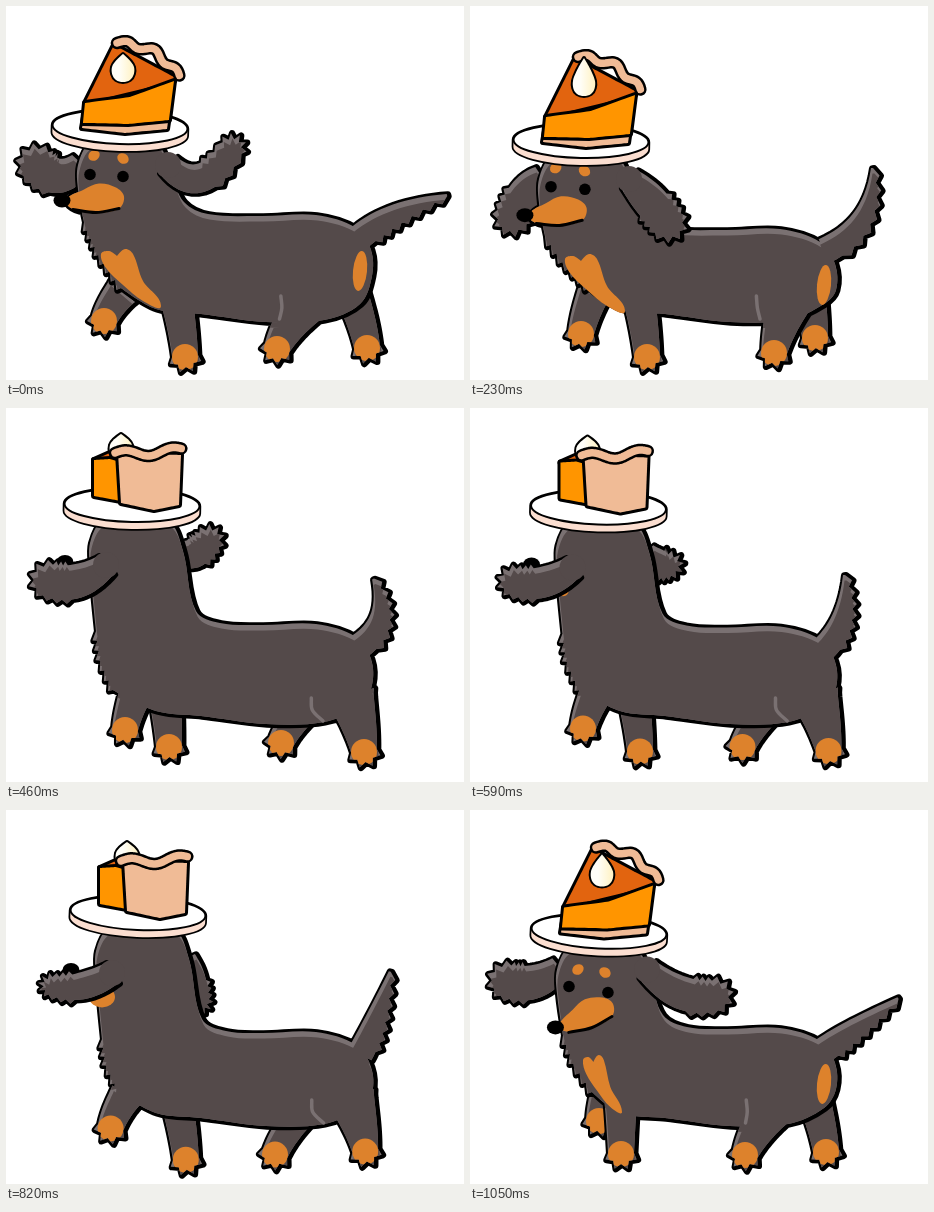
Write an HTML page with a canvas that moves like this. It is 458 by 374 pixels and loops after 1.15 s.

```html
<!DOCTYPE html>
<html lang="en">
<head>
<meta charset="utf-8">
<title>Dachshund with pie</title>
<style>
html, body { margin: 0; width: 100%; height: 100%; overflow: hidden; background: #fff; }
canvas { display: block; }
</style>
</head>
<body>
<canvas id="stage" width="458" height="374"></canvas>
<script>
const ctx = document.getElementById('stage').getContext('2d');
const INK = '#000', COAT = '#544a4a', SHEEN = '#7a7172', TAN = '#dd822c';
const ORANGE = '#ff9500', SPICE = '#e2640f', CRUST = '#f0bb96', RIM = '#fbded0';
const SMOOTH = 0, CORNER = 1, FUR = 2;
const { PI, sin, cos, hypot, atan2 } = Math;
const mix = (a, b, t) => a + (b - a) * t;

// ---- shapes: every outline runs clockwise ----

function addFur(path, [ax, ay], [bx, by]) {
  const dx = bx - ax, dy = by - ay, len = hypot(dx, dy), n = Math.round(len / 10);
  const lean = dy > 0 ? .85 : .1;
  for (let i = 0; i < n; i++) {
    const k = (i + lean) / n, end = (i + 1) / n;
    path.lineTo(ax + dx * k + dy / len * 5, ay + dy * k - dx / len * 5);
    path.lineTo(ax + dx * end, ay + dy * end);
  }
}

// Spline through [x, y, kind]; FUR points are reached along a shaggy edge.
function curve(pts, closed = true) {
  const path = new Path2D(), n = pts.length;
  const at = i => closed ? pts[(i + n) % n] : pts[Math.max(0, Math.min(n - 1, i))];
  const tangent = i => {
    if (at(i)[2]) return [0, 0];
    const [px, py] = at(i - 1), [qx, qy] = at(i + 1), d = hypot(qx - px, qy - py);
    return [(qx - px) / d, (qy - py) / d];
  };
  path.moveTo(...pts[0].slice(0, 2));
  for (let i = 0; i < (closed ? n : n - 1); i++) {
    const [ax, ay] = at(i), [bx, by, kind] = at(i + 1);
    if (kind === FUR) { addFur(path, at(i), at(i + 1)); continue; }
    const k = hypot(bx - ax, by - ay) / 3, [ux, uy] = tangent(i), [vx, vy] = tangent(i + 1);
    path.bezierCurveTo(ax + ux * k, ay + uy * k, bx - vx * k, by - vy * k, bx, by);
  }
  if (closed) path.closePath();
  return path;
}

// Tapered tube along a quadratic spine, with optional shaggy sides and a tufted end.
function limb(from, bend, to, half, shag = () => 0, tufts = 0) {
  const steps = 16, left = [], right = [];
  let angle;
  for (let i = 0; i <= steps; i++) {
    const t = i / steps;
    const [x, y] = [0, 1].map(k => mix(mix(from[k], bend[k], t), mix(bend[k], to[k], t), t));
    const [dx, dy] = [0, 1].map(k => mix(bend[k] - from[k], to[k] - bend[k], t));
    angle = atan2(dy, dx);
    const side = s => {
      const r = s * (half(t) + (i % 2 ? shag(t, s) : 0));
      return [x + sin(angle) * r, y - cos(angle) * r];
    };
    left.push(side(1));
    right.unshift(side(-1));
  }
  for (let k = 1; k < tufts; k++) {
    const a = angle + PI * (k / tufts - .5), r = half(1) + (k % 2 ? 4 : -2);
    left.push([to[0] + cos(a) * r, to[1] + sin(a) * r]);
  }
  const path = new Path2D();
  [...left, ...right].forEach(p => path.lineTo(...p));
  path.closePath();
  return path;
}

function oval(x, y, rx, ry = rx, turn = 0) {
  const path = new Path2D();
  path.ellipse(x, y, rx, ry, turn, 0, 2 * PI);
  return path;
}
function fill(path, color) { ctx.fillStyle = color; ctx.fill(path); }
function stroke(path, width, color = INK) {
  ctx.strokeStyle = color;
  ctx.lineWidth = width;
  ctx.stroke(path);
}
function shifted(x, y, paint) {
  ctx.save();
  ctx.translate(x, y);
  paint();
  ctx.restore();
}
function within(path, paint) {
  ctx.save();
  ctx.clip(path);
  paint();
  ctx.restore();
}

// Merged coat pieces: ink heavier on the right, pale rim along the top.
function coat(...pieces) {
  const path = new Path2D();
  pieces.forEach(p => path.addPath(p));
  shifted(1.2, .4, () => stroke(path, 6.5));
  fill(path, SHEEN);
  within(path, () => shifted(1.5, 5.5, () => fill(path, COAT)));
}

// ---- dog ----

const earRoots = {
  front: [[-39, 36], [48, 38]],
  side: [null, [39, 50]],
  away: [[-26, 60], [46, 46]]
};

function earPath(p, i) {
  const [px, py] = p.plate, [rx, ry] = earRoots[p.view][i], [tx, ty, sag, tip] = p.ears[i];
  const bend = [px + (rx + tx) / 2, py + (ry + ty) / 2 + sag];
  return limb([px + rx, py + ry], bend, [px + tx, py + ty],
    t => mix(12, tip, t) + 3 * sin(PI * t), t => t > .65 ? 4 : 0, 10);
}

function legPath([x, y], hind, near) {
  const hip = hind ? [mix(x, 335, .6), 288] : [mix(x, 150, .35), 285];
  const top = hind && near ? 25 : 17;
  const bend = [mix(x, hip[0], .25), mix(hip[1], y, .55)];
  return limb(hip, bend, [x, y], t => mix(top, 13, t ** .7), () => 0, 8);
}

function paw(leg, [x, y]) {
  within(leg, () => fill(oval(x, y + 1, 13, 13), TAN));
}

function torso({ view, plate: [px, py], back, chest }) {
  const jaw = px - (view === 'side' ? 26 : 36), throat = back + 6;
  return curve([
    [jaw - 6, py + 62], [jaw - 6, py + 38], [px - 30, py + 16], [px, py + 10], [px + 36, py + 15],
    [px + 51, py + 46], [px + 64, back - 14], [px + 88, back - 2], [255, back], [310, back - 1],
    [350, back + 12], [365, back + 34], [366, back + 60], [354, 298], [318, 314], [260, 316],
    [195, 308], [150, 303], [chest, 282, CORNER],
    [(chest + jaw) / 2 - 4, (282 + throat) / 2, FUR], [jaw, throat, FUR]
  ]);
}

function tailPath({ back, tail: [bx, by, tx, ty] }) {
  return limb([354, back + 21], [bx, by], [tx, ty], t => 12 * (1 - t ** 2) + 1,
    (t, side) => side < 0 && t > .15 ? 5 : 0);
}

// Muzzle points are relative to the middle between the eyes.
const muzzle = [[-40, 25], [-22, 14], [-7, 8], [10, 12], [18, 21], [13, 33], [-8, 37], [-32, 34]];
const profile = [[-80, 72], [-57, 67], [-42, 52], [-30, 25], [0, 40], [-15, 98], [-48, 100], [-74, 92]];
const profileTan = [[-76, 80], [-50, 74], [-28, 72], [-18, 80], [-18, 93], [-30, 99], [-50, 98], [-72, 92]];

function faceOf({ view, plate: [px, py], face }) {
  const place = pts => pts.map(([x, y]) => [px + x, py + y]);
  if (view === 'away') return { nose: [px - 67, py + 57] };
  if (view === 'side') return {
    outline: place(profile), tan: place(profileTan), nose: [px - 81, py + 77],
    mouth: place([[-75, 91], [-50, 99], [-27, 100]]), eyes: place([[-20, 65]]), brows: place([[-26, 46]])
  };
  const [eyeY, turn] = face, skew = 1 + 6 * turn;
  const spin = pts => place(pts.map(([x, y]) =>
    [x * cos(turn) + y * sin(turn) - 14 + 12 * turn, y * cos(turn) - x * sin(turn) + eyeY]));
  return {
    outline: spin(muzzle), tan: spin(muzzle), nose: spin([[-44, 25]])[0],
    mouth: spin([[-33, 34], [-10, 37], [13, 33]]),
    eyes: place([[-30, eyeY - skew], [3 + 18 * turn, eyeY + skew]]),
    brows: place([[-26 + 15 * turn, eyeY - 20], [3 + 9 * turn, eyeY - 17]])
  };
}

const heart = [[0, 0], [8, -3], [16, 2, CORNER], [24, -5], [32, 0], [42, 27], [60, 52], [42, 47], [22, 31], [5, 14]];

function dog(p) {
  const [px, py] = p.plate, away = p.view === 'away', [foreNear, hindNear, foreFar, hindFar] = p.feet;
  const face = faceOf(p), nose = oval(...face.nose, 8.5, 7);
  for (const [foot, hind] of [[hindFar, true], [foreFar, false]]) {
    const leg = legPath(foot, hind, false);
    coat(leg);
    paw(leg, foot);
  }
  const overEar = away ? 0 : 1;
  if (p.ears[1 - overEar]) coat(earPath(p, 1 - overEar));
  if (away) fill(nose, INK);

  const fore = legPath(foreNear, false, true), hind = legPath(hindNear, true, true);
  const pieces = [torso(p), tailPath(p), fore, hind];
  if (face.outline) pieces.push(curve(face.outline));
  coat(...pieces);
  paw(fore, foreNear);
  paw(hind, hindNear);
  const thigh = hindNear[0] * .35 + 180;
  stroke(curve([[thigh, 290], [thigh + 1, 302], [hindNear[0] * .5 + 138, 313]], false), 3.5, SHEEN);

  if (p.bib) {
    const [x, y, sx] = p.bib;
    fill(curve(heart.map(([hx, hy, kind]) => [x + hx * sx, y + hy, kind])), TAN);
  }
  if (p.view === 'front') fill(oval(354, p.back + 55, 7, 20, .1), TAN);
  if (away) fill(oval(px - 36, py + 84, p.cheek, p.cheek * .8), TAN);

  const [rx, ry] = earRoots[p.view][overEar];
  coat(earPath(p, overEar));
  fill(oval(px + rx, py + ry, 13), COAT);
  if (away) return;
  face.brows.forEach(([x, y], i) => fill(oval(x, y, 6, 5, i ? .6 : -.6), TAN));
  fill(curve(face.tan), TAN);
  stroke(curve(face.mouth, false), 3);
  fill(nose, INK);
  face.eyes.forEach(e => fill(oval(...e, 5.8), INK));
}

// ---- pie on a plate, measured from the middle of the plate ----

function slab(color, ...corners) {
  const path = curve(corners.map(([x, y]) => [x, y, CORNER]));
  stroke(path, 6);
  fill(path, color);
}
function lip(x0, y0, x1, y1, waves, bulge) {
  const path = new Path2D(), dx = x1 - x0, dy = y1 - y0, len = hypot(dx, dy);
  for (let t = 0; t <= 1; t += 1 / 40) {
    const off = 3 * sin(2 * PI * waves * t) + bulge * sin(PI * t);
    path.lineTo(x0 + dx * t + dy / len * off, y0 + dy * t - dx / len * off);
  }
  stroke(path, 12.5);
  stroke(path, 7.5, CRUST);
}
function cream(x, y, height) {
  const path = curve([[x, y - height, CORNER], [x + 11, y - 4], [x + 7, y + 9], [x - 7, y + 9], [x - 11, y - 4]]);
  const tint = ctx.createLinearGradient(x - 4, y, x + 13, y);
  tint.addColorStop(0, '#fffef8');
  tint.addColorStop(1, '#fff0bc');
  stroke(path, 4);
  fill(path, tint);
}

const pies = {
  front(height) {
    slab(SPICE, [-6, -82], [54, -50], [54, -46], [-35, -24]);
    slab(CRUST, [-36, -10], [49, -12], [47, 2], [5, 6], [-38, 1]);
    slab(ORANGE, [-35, -24], [10, -30], [54, -46], [49, -7], [8, -3], [-37, -4]);
    lip(-3, -84, 60, -49, 2.5, 10);
    cream(3, -56, height);
  },
  side(height) {
    slab(SPICE, [-40, -46], [-8, -61], [16, -66], [38, -42], [33, -38], [0, -40]);
    slab(CRUST, [-41, -8], [28, -2], [33, -38], [41, -38], [38, 4], [31, 9], [-5, 7], [-41, 1]);
    slab(ORANGE, [-40, -46], [0, -40], [33, -38], [31, 3], [-5, 2], [-41, -4]);
    lip(17, -67, 39, -39, 1.5, 3);
    cream(-9, -60, height);
  },
  away(height) {
    slab(SPICE, [-38, -45], [-20, -53], [-12, -44]);
    cream(-11, -56, height);
    slab(ORANGE, [-38, -45], [-22, -46], [-12, -43], [-11, -4], [-38, -9]);
    slab(CRUST, [-14, -52], [49, -50], [47, 0], [22, 5], [-11, -2]);
    lip(-17, -52, 51, -56, 1.5, -2);
  }
};

function dish({ view, plate: [x, y, tilt], drop }) {
  const rim = new Path2D(), top = oval(0, 0, 67.5, 17);
  rim.ellipse(0, 0, 67.5, 17, 0, PI, 0);
  rim.ellipse(0, 7, 67.5, 17, 0, 0, PI);
  rim.closePath();
  shifted(x, y, () => {
    ctx.rotate(tilt);
    stroke(rim, 3.5);
    fill(rim, RIM);
    fill(top, '#fff');
    stroke(top, 2);
    ctx.rotate(-tilt);
    pies[view](drop);
  });
}

// ---- poses: feet are near fore, near hind, far fore, far hind; ears are [x, y, sag, tip] ----

const frontUp = {
  view: 'front', plate: [114, 121, .03], drop: 17, back: 210, chest: 115, face: [48.5, 0], bib: [95, 248, 1],
  tail: [385, 205, 441, 189], ears: [[-84, 37, 24, 17], [112, 21, 43, 11]],
  feet: [[179, 350], [271, 342], [98, 314], [361, 341]]
};
const frontDown = {
  view: 'front', plate: [111, 135, .02], drop: 27, back: 224, chest: 118, face: [47, .05], bib: [95, 253, 1],
  tail: [405, 222, 402, 162], ears: [[-69, 76, -10, 16], [87, 82, -4, 16]],
  feet: [[177, 350], [304, 346], [111, 327], [345, 331]]
};
const frontTurn = {
  view: 'front', plate: [129, 121.5, .05], drop: 21, back: 219, chest: 122, face: [58, .33], bib: [113, 250, .65],
  tail: [380, 222, 428, 188], ears: [[-93, 49, 16, 16], [116, 64, 20, 15]],
  feet: [[151, 343], [275, 344], [129, 310], [356, 341]]
};
const sideA = {
  view: 'side', plate: [109, 112, .02], drop: 21, back: 219, chest: 107, bib: [97, 241, .35],
  tail: [400, 224, 379, 153], ears: [null, [71, 104, 5, 18]],
  feet: [[129, 346], [358, 343], [186, 343], [292, 336]]
};
const sideB = { ...sideA, feet: [[131, 343], [295, 337], [202, 331], [359, 343]] };
const awayUp = {
  view: 'away', plate: [126, 97, .02], drop: 15, back: 217, chest: 107, cheek: 1,
  tail: [387, 215, 367, 171], ears: [[-84, 75, 17, 16], [77, 35, 15, 12]],
  feet: [[119, 321], [358, 343], [163, 338], [275, 334]]
};
const awayDown = {
  view: 'away', plate: [131, 102, .04], drop: 15, back: 222, chest: 112, cheek: 11,
  tail: [373, 215, 381, 163], ears: [[-87, 73, 14, 10], [65, 80, 0, 9]],
  feet: [[107, 318], [359, 341], [177, 347], [270, 342]]
};

function blend(a, b, t) {
  if (typeof a === 'number') return mix(a, b, t);
  if (Array.isArray(a)) return a.map((v, i) => blend(v, b[i], t));
  if (typeof a === 'string') return a;
  return Object.fromEntries(Object.keys(a).map(k => [k, blend(a[k], b[k], t)]));
}

const steps = [
  [0, frontUp], [130, blend(frontUp, frontDown, .5)], [230, frontDown],
  [360, sideA], [460, awayUp], [590, blend(awayUp, awayDown, .5)],
  [690, awayDown], [820, blend(awayUp, awayDown, 1.2)], [920, sideB], [1050, frontTurn]
];
const start = performance.now();
let shown;
function tick() {
  const t = (performance.now() - start) % 1150;
  const pose = steps.filter(([from]) => from <= t).pop()[1];
  if (pose !== shown) {
    shown = pose;
    ctx.clearRect(0, 0, 458, 374);
    ctx.lineJoin = ctx.lineCap = 'round';
    dog(pose);
    dish(pose);
  }
  requestAnimationFrame(tick);
}
tick();
</script>
</body>
</html>
```
